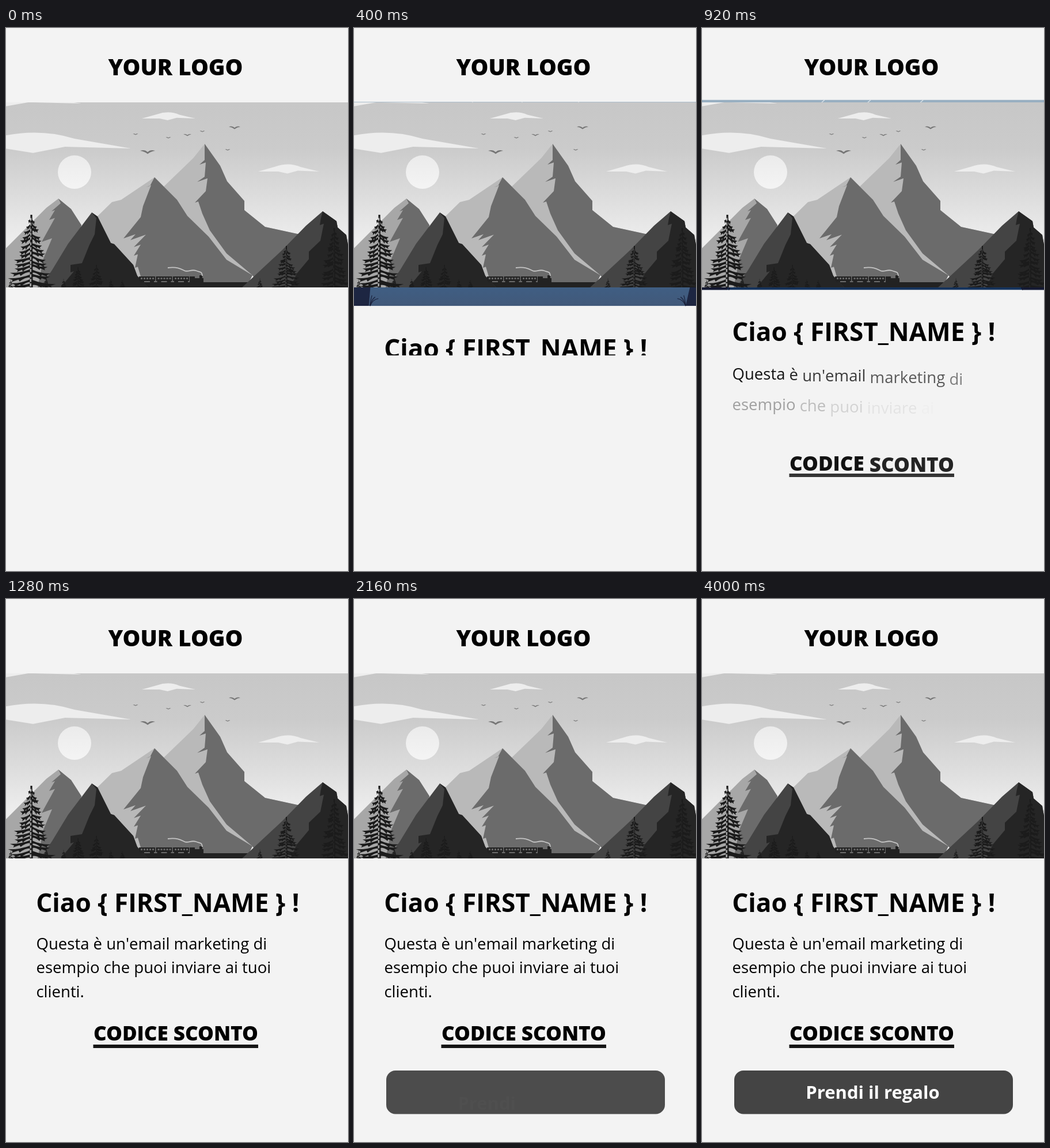
Recreate the animation shown at these times as an HTML page with a canvas. Size 594x942 px, loop 4040 ms.

```html
<!DOCTYPE html>
<html lang="it">
<head>
<meta charset="utf-8">
<style>
  html, body { margin: 0; width: 100%; height: 100%; overflow: hidden; background: #f3f3f3; }
  canvas { display: block; }
</style>
</head>
<body>
<canvas id="stage" width="594" height="942"></canvas>
<script>
const c = document.getElementById('stage').getContext('2d');
const LOOP = 4040, STEP = 40;
const TOP = 129, GROUND = 450, MIDDLE = (TOP + GROUND) / 2;
const PAPER = '#f3f3f3', INK = '#000';
const clamp = v => Math.max(0, Math.min(1, v));
const inOut = p => p < .5 ? 2 * p * p : 1 - 2 * (1 - p) ** 2;

let seed = 7;
const rnd = () => (seed = (seed * 16807) % 2147483647) / 2147483647;

function gradient(y0, y1, ...colors) {
  const g = c.createLinearGradient(0, y0, 0, y1);
  colors.forEach((color, i) => g.addColorStop(i / (colors.length - 1), color));
  return g;
}

function polygon(color, points) {
  c.fillStyle = color;
  c.beginPath();
  points.forEach(([x, y]) => c.lineTo(x, y));
  c.fill();
}

// Lens with a bulge on top and a ragged underside
function cloud(x0, x1, y, h) {
  const at = (u, v) => [x0 + (x1 - x0) * u, y + h * v];
  c.fillStyle = '#ededed';
  c.beginPath();
  c.moveTo(...at(0, 0));
  c.lineTo(...at(.28, -.6));
  c.quadraticCurveTo(...at(.5, -1.2), ...at(.7, -.55));
  c.lineTo(...at(1, 0));
  c.lineTo(...at(.65, -.1));
  c.lineTo(...at(.48, .25));
  c.lineTo(...at(.33, 0));
  c.fill();
}

function bird(x, y, w) {
  const u = w / 2;
  c.fillStyle = '#757575';
  c.beginPath();
  c.moveTo(x, y + u * .1);
  for (const side of [1, -1]) {
    c.quadraticCurveTo(x + side * u * .4, y - u * .3, x + side * u, y - u * .08);
    c.quadraticCurveTo(x + side * u * .4, y, x, y + u * .35);
    c.lineTo(x, y + u * .1);
  }
  c.fill();
}

function sky() {
  c.fillStyle = gradient(TOP, GROUND, '#c7c7c7', '#cbcbcb', '#dcdcdc', '#eee', '#f2f2f2');
  c.fillRect(0, TOP, 594, GROUND - TOP);
  cloud(-130, 131, 131, 22);
  cloud(-110, 217, 209, 31);
  cloud(236, 329, 157, 12);
  cloud(438, 544, 249, 14);
  c.fillStyle = gradient(221, 279, '#ebebeb', '#f4f4f4');
  c.beginPath();
  c.arc(119, 250, 29, 0, 7);
  c.fill();
  bird(246, 214, 26);
  bird(397, 172, 20);
  bird(315, 185, 14);
  [[225, 184], [282, 190], [341, 179], [385, 211]].forEach(([x, y]) => bird(x, y, 9));
}

// Lit silhouette with a shaded right face. Each seam point is a tooth [x, y, depth].
function mountain(lit, shade, left, peak, right, seam) {
  const teeth = seam.flatMap(([x, y, depth = 0]) => [[x, y], [x + depth, y - depth * .35]]);
  polygon(lit, [...left, peak, ...right]);
  polygon(shade, [peak, ...right, ...teeth.reverse()]);
}

function mountains() {
  const pale = '#b9b9b9', mid = '#6b6b6b', dark = '#444', black = '#252525';
  mountain(pale, mid, [[280, 400], [273, 276], [325, 226]], [345, 201],
    [[372, 239], [384, 266], [414, 300], [414, 316], [450, 345], [510, 358], [510, 445], [440, 445], [428, 429]],
    [[345, 229], [336, 237, 11], [345, 258], [332, 267, 18], [347, 283], [328, 303, 6], [341, 322], [354, 351], [383, 391]]);
  mountain('#a7a7a7', mid, [[0, GROUND], [0, 382], [70, 312]], [91, 296],
    [[113, 314], [131, 342], [100, GROUND]],
    [[95, 304], [79, 318, 6], [75, 333, 10], [62, 371, 18], [65, 400], [55, GROUND]]);
  mountain(pale, mid, [[140, GROUND], [140, 345], [184, 302], [200, 298]], [258, 259],
    [[297, 298], [315, 326], [352, 362], [383, 402], [428, 429], [420, 445]],
    [[250, 274], [243, 276, 9], [238, 309], [234, 328], [204, 365, 21], [216, 368, 27], [222, 380, 12], [222, 395, 7], [224, 416, 5], [238, 445]]);
  c.fillStyle = '#222';
  c.fillRect(225, 441, 200, 9);
  mountain(dark, black, [[60, GROUND], [80, 420], [108, 374]], [149, 320],
    [[159, 327], [182, 373], [188, 375], [221, 411], [228, 430], [247, GROUND]],
    [[157, 330], [154, 358], [145, 376], [132, 408], [112, 411], [112, 424, 6], [95, GROUND]]);
  mountain(dark, black, [[410, GROUND], [480, 385], [521, 343]], [550, 318],
    [[574, 335], [576, 346], [591, 359], [594, 376], [594, GROUND]],
    [[547, 330], [545, 342, 7], [546, 369], [526, 388], [526, 401], [505, 426], [494, GROUND]]);
}

// Conifer: trunk plus rows of drooping, tapering branches with twigs
function fir(x, top, w, rows) {
  const p = new Path2D(), h = GROUND + 2 - top, gap = h / rows, trunk = w * .03;
  p.moveTo(x - trunk * .6, top);
  p.lineTo(x + trunk * .6, top);
  p.lineTo(x + trunk, GROUND);
  p.lineTo(x - trunk, GROUND);
  for (let i = 2; i <= rows; i++) {
    const k = i / rows;
    for (const side of [-1, 1]) {
      const len = side * w / 2 * k ** .85 * (.75 + .3 * rnd());
      const y = top + h * k - gap * (.6 + .6 * rnd());
      const droop = gap * (.2 + .7 * rnd());
      p.moveTo(x, y - gap * .3);
      p.quadraticCurveTo(x + len * .5, y + droop, x + len, y + droop * .9);
      p.lineTo(x + len * .8, y + droop + gap * .3);
      p.lineTo(x + len * .85, y + droop + gap * .7);
      p.lineTo(x + len * .55, y + droop * .7 + gap * .4);
      p.lineTo(x + len * .5, y + droop + gap * .6);
      p.quadraticCurveTo(x + len * .25, y + gap * .3, x, y + gap * .4);
    }
  }
  return p;
}

const firs = [fir(44, 324, 88, 16), fir(487, 378, 54, 14), fir(570, 347, 62, 15), fir(125, 415, 27, 8), fir(157, 411, 30, 8)];
for (const x of [8, 70, 100, 182, 202, 441]) firs.push(fir(x, 433 + 4 * rnd(), 12, 5));

function train() {
  for (let car = 0; car < 3; car++) {
    const x = 231 + car * 29.5;
    c.fillStyle = '#222';
    c.fillRect(x, 431, 28, 8);
    c.fillRect(x + 2, 439, 7, 2);
    c.fillRect(x + 19, 439, 7, 2);
    c.fillStyle = '#666';
    for (let i = 0; i < 5; i++) c.fillRect(x + 3 + i * 5, 433, 3, 3);
  }
  c.fillStyle = '#222';
  c.fillRect(319, 431, 9, 10);
  c.fillRect(327, 434, 16, 7);
  c.fillRect(336, 429, 5, 6);
  c.strokeStyle = '#c4c4c4';
  c.lineWidth = 1.8;
  c.stroke(new Path2D('M281 416C298 414 304 418 310 421S322 418 330 421S340 422 341 430'));
}

function scene() {
  c.save();
  c.beginPath();
  c.rect(0, TOP, 594, GROUND - TOP);
  c.clip();
  sky();
  mountains();
  train();
  c.fillStyle = '#1b1b1b';
  firs.forEach(f => c.fill(f));
  c.restore();
}

// Blue picture behind the grey scene: rises, then shrinks until hidden
function bluePicture(t) {
  if (t < 240 || t > 1120) return;
  const scale = 1 + Math.max(0, 1100 - t) * .000147;
  const left = 1 - clamp((t - 240) / 240);
  c.save();
  c.globalAlpha = 1 - (1 - clamp((t - 240) / 400)) ** 3.2;
  c.translate(297, MIDDLE + 140 * left ** 2);
  c.scale(scale, scale);
  c.translate(-297, -MIDDLE);
  c.fillStyle = '#98afc1';
  c.fillRect(0, TOP, 594, 60);
  c.fillStyle = gradient(TOP + 60, GROUND, '#98afc1', '#6d96b8', '#114980', '#16335c');
  c.fillRect(0, TOP + 60, 594, GROUND - TOP - 60);
  c.lineWidth = 1.2;
  for (const x of [205, 283, 372]) {
    c.strokeStyle = '#dde5eb';
    c.stroke(new Path2D(`M${x} 138l10-9`));
  }
  const bank = c.strokeStyle = '#151a33';
  polygon(bank, [[0, 415], [54, 415], [51, GROUND], [0, GROUND]]);
  polygon(bank, [[594, 415], [558, 415], [550, GROUND], [594, GROUND]]);
  for (const [x, side] of [[53, 1], [550, -1]])
    for (const lean of [3, 8, 13])
      c.stroke(new Path2D(`M${x} ${GROUND}q${side * lean * .3}-10 ${side * lean}-${18 - lean * .5}`));
  c.restore();
}

function font(weight, size) {
  c.font = `${weight} ${size}px "Open Sans", sans-serif`;
}

// Words fade in and rise one after another
function words(text, x, y, t, start, lag, drop) {
  const gap = c.measureText(' ').width;
  text.split(' ').forEach((word, i) => {
    const p = inOut(clamp((t - start - i * lag) / 355));
    c.globalAlpha = p;
    c.fillText(word, x, y + drop * (1 - p));
    x += c.measureText(word).width + gap;
  });
  c.globalAlpha = 1;
}

function title(t) {
  if (t < 240) return;
  c.save();
  c.beginPath();
  c.rect(0, 480, 594, 88);
  c.clip();
  font(700, 44.1);
  c.fillStyle = INK;
  c.fillText('Ciao { FIRST_NAME } !', 52.2, 543 + 80 * (1 - clamp((t - 240) / 400)) ** 2);
  c.restore();
}

function message(t) {
  const start = 633, lag = 28;
  let delay = start;
  c.fillStyle = INK;
  font(400, 27.54);
  c.fontKerning = 'none';
  ["Questa è un'email marketing di", 'esempio che puoi inviare ai tuoi', 'clienti.'].forEach((text, i) => {
    words(text, 52.5, 608 + i * 41.3, t, delay, lag, 20.5);
    delay += text.split(' ').length * lag;
  });
  c.fontKerning = 'auto';
  const code = 'CODICE SCONTO';
  font(800, 35);
  words(code, 295 - c.measureText(code).width / 2, 766, t, start, lag, 26.5);
  c.globalAlpha = inOut(clamp((t - start - lag) / 355));
  c.fillStyle = '#161616';
  c.fillRect(151.5, 773, 286.5, 6);
  c.globalAlpha = 1;
}

function button(t) {
  const p = clamp((t - 1400) / 800);
  c.globalAlpha = p;
  c.fillStyle = '#444';
  c.beginPath();
  c.roundRect(56, 818 + 31 * (1 - p) ** 2.6, 484, 75.5, 16);
  c.fill();
  c.globalAlpha = 1;
  c.fillStyle = '#fff';
  font(700, 31);
  words('Prendi il regalo', 180.3, 866.5, t, 2125, 60, 20);
}

function draw() {
  const t = Math.floor(performance.now() % LOOP / STEP) * STEP;
  c.fillStyle = PAPER;
  c.fillRect(0, 0, 594, 942);
  bluePicture(t);
  scene();
  c.fillStyle = INK;
  font(800, 38.8);
  c.textAlign = 'center';
  c.fillText('YOUR LOGO', 294.5, 82);
  c.textAlign = 'left';
  title(t);
  message(t);
  button(t);
  requestAnimationFrame(draw);
}
draw();
</script>
</body>
</html>
```
